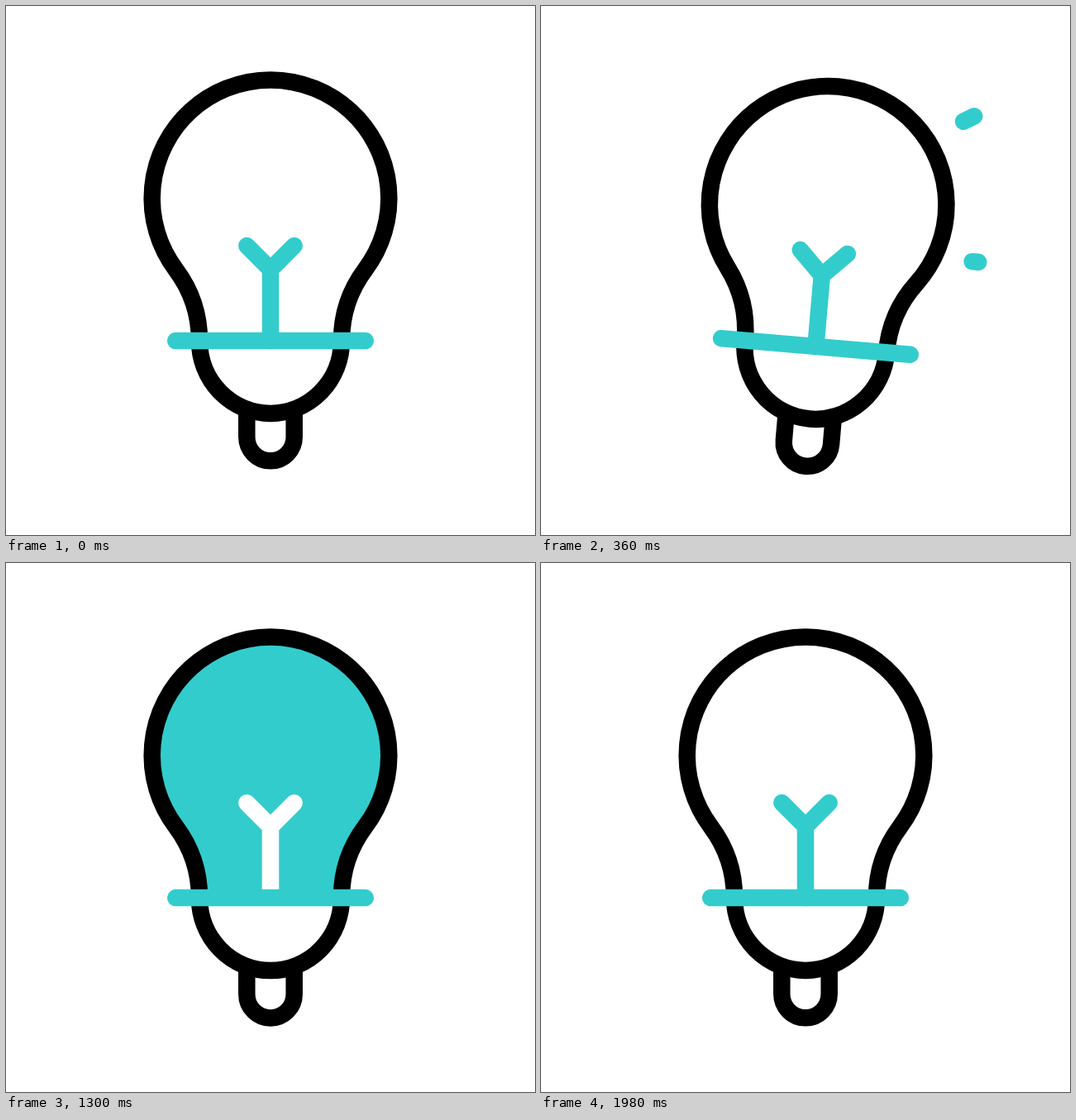
Write an HTML page with a canvas that moves like this. It is 640 by 640 pixels and loops after 2.4 s.

```html
<!DOCTYPE html>
<html lang="en">
<head>
<meta charset="utf-8">
<title>Light bulb</title>
<style>
  html, body { margin: 0; width: 100%; height: 100%; overflow: hidden; background: #fff; }
  canvas { display: block; width: 100vw; height: 100vh; }
</style>
</head>
<body>
<canvas id="stage" width="640" height="640"></canvas>
<script>
const ctx = document.getElementById('stage').getContext('2d');
const TEAL = '#33cccc', INK = '#000', PAPER = '#fff';
const LOOP = 2400, MOVE = 700;
const ON_START = 20, OFF_START = 1280;
const LIT_AFTER = 360, DARK_AFTER = 240;
const PIVOT = { x: 320, y: 550 };

const bulb = new Path2D(
  'M234 405A143.3 143.3 0 0 0 205.4 318.8A143.3 143.3 0 1 1 434.6 318.8' +
  'A143.3 143.3 0 0 0 406 405A86 88 0 0 1 234 405Z');
const glass = new Path2D(
  'M234 405A143.3 143.3 0 0 0 205.4 318.8A143.3 143.3 0 1 1 434.6 318.8' +
  'A143.3 143.3 0 0 0 406 405Z');
const tip = new Path2D('M291.3 489V521.6A28.7 28.7 0 0 0 348.7 521.6V489');
const filament = new Path2D('M291.3 290.1L320 318.8L348.7 290.1M320 318.8V405');
const bar = new Path2D('M205.2 405H434.8');

const clamp = x => Math.min(1, Math.max(0, x));
const ease = x => { x = clamp(x); return x * x * (3 - 2 * x); };

// Eased value through [time, value] keys
function keyed(keys, t) {
  let v = keys[0][1];
  for (let i = 1; i < keys.length; i++) {
    const [t0, v0] = keys[i - 1], [t1, v1] = keys[i];
    if (t >= t0) v = v0 + (v1 - v0) * ease((t - t0) / (t1 - t0));
  }
  return v;
}

function press(t) {
  if (t <= 0 || t >= MOVE) return 0;
  const peak = 240;
  const x = t < peak ? t / peak : (MOVE - t) / (MOVE - peak);
  return 10 * Math.pow(x, 1.8);
}

const tilt = t => keyed([[0, 0], [188, -5], [350, 5], [MOVE, 0]], t);
const pulse = (t, mid) => clamp(1 - Math.abs(t - mid) / 80);

function stroke(path, color, cap = 'round') {
  ctx.strokeStyle = color;
  ctx.lineCap = cap;
  ctx.stroke(path);
}

function rays(side, amount) {
  if (amount <= 0) return;
  const path = new Path2D();
  const ray = (x, y, dx, dy) => {
    path.moveTo(320 + side * x, y);
    path.lineTo(320 + side * (x + dx * amount), y + dy * amount);
  };
  ray(154.6, 118.6, 26, -15.6);
  ray(179.6, 286.4, 16, 0);
  stroke(path, TEAL);
}

function draw(time) {
  const t = time % LOOP;
  const on = t - ON_START, off = t - OFF_START;
  const lit = on >= LIT_AFTER && off < DARK_AFTER;

  ctx.setTransform(1, 0, 0, 1, 0, 0);
  ctx.fillStyle = PAPER;
  ctx.fillRect(0, 0, 640, 640);

  ctx.translate(PIVOT.x, PIVOT.y + press(on) + press(off));
  ctx.rotate(tilt(on) * Math.PI / 180);
  ctx.translate(-PIVOT.x, -PIVOT.y);
  ctx.lineWidth = 20.5;
  ctx.lineJoin = 'miter';

  if (lit) {
    ctx.fillStyle = TEAL;
    ctx.fill(glass);
  }
  stroke(tip, INK, 'butt');
  stroke(bulb, INK);
  stroke(filament, lit ? PAPER : TEAL);
  stroke(bar, TEAL);
  rays(-1, pulse(on, 180));
  rays(1, pulse(on, 300));
}

const start = performance.now();
function tick() {
  draw(performance.now() - start);
  requestAnimationFrame(tick);
}
tick();
</script>
</body>
</html>
```
